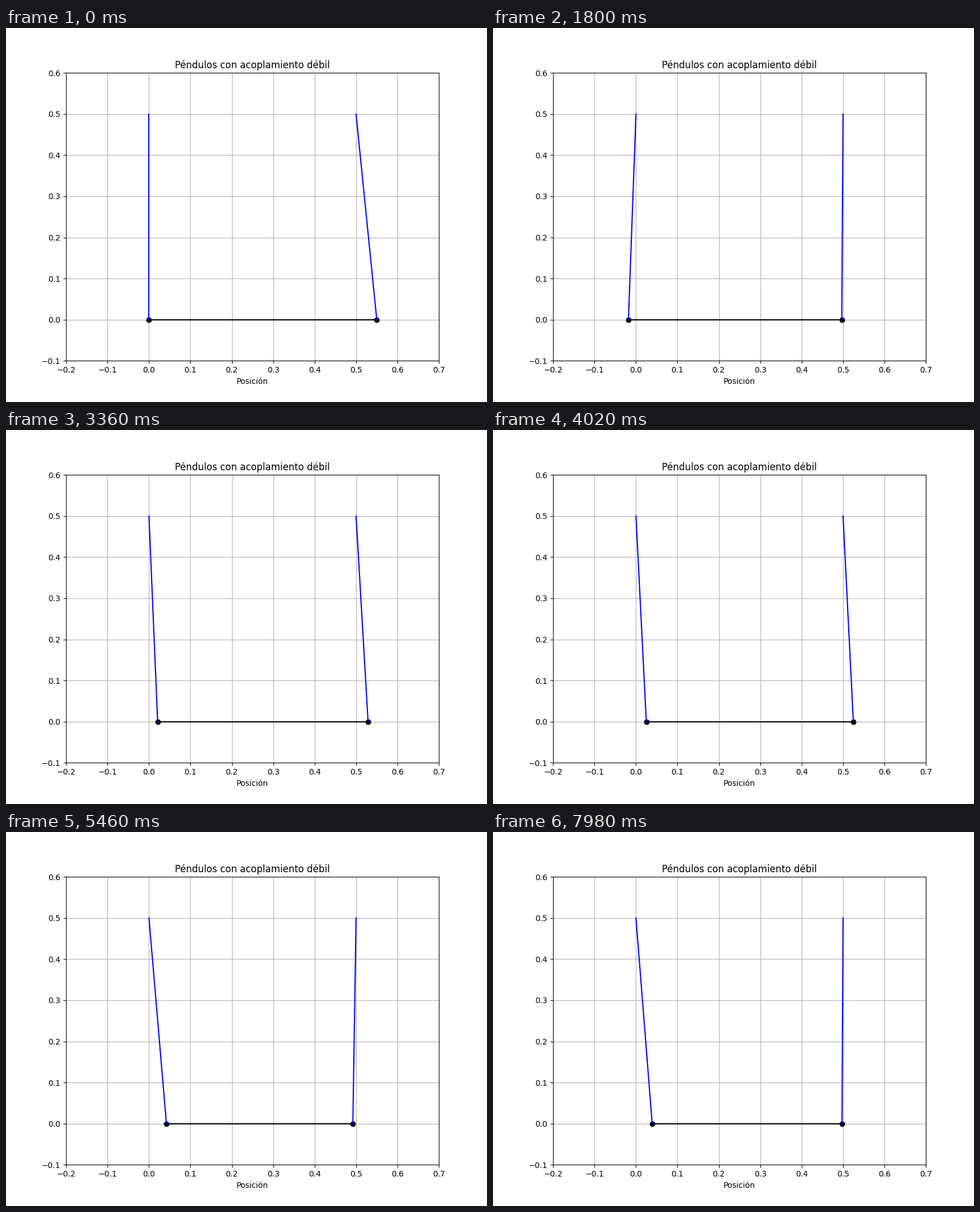
Write a matplotlib script that moves like this. It is 849x660 px and loops after 8 s.

```python
import numpy as np
import matplotlib.pyplot as plt
from matplotlib.animation import FuncAnimation

INTERVAL = 20        # ms per drawn frame
HOLD = 3             # drawn frames per simulation step
FRAMES = 400

AMPLITUDE = 0.05
LENGTH = 0.5
PIVOTS = (0.0, 0.5)
# Normal modes, in radians per simulation step
IN_PHASE = 2 * np.pi * 0.08933
OPPOSED = 2 * np.pi * 0.09329


def bob_positions(step):
    """Horizontal bob positions from the sum of both normal modes."""
    together = np.cos(IN_PHASE * step)
    apart = np.cos(OPPOSED * step)
    left = PIVOTS[0] + AMPLITUDE / 2 * (together - apart)
    right = PIVOTS[1] + AMPLITUDE / 2 * (together + apart)
    return left, right


fig, ax = plt.subplots(figsize=(8.49, 6.6), dpi=100)
ax.set_xlim(-0.2, 0.7)
ax.set_ylim(-0.1, 0.6)
ax.set_xlabel("Posición")
ax.set_title("Péndulos con acoplamiento débil")
ax.grid(True)

spring, = ax.plot([], [], "o-", color="black")
rods = [ax.plot([], [], "b-")[0] for _ in PIVOTS]


def update(frame):
    bobs = bob_positions(frame // HOLD)
    spring.set_data(bobs, (0, 0))
    for rod, pivot, bob in zip(rods, PIVOTS, bobs):
        rod.set_data((pivot, bob), (LENGTH, 0))
    return [spring, *rods]


def init():
    return update(0)


anim = FuncAnimation(fig, update, frames=FRAMES, init_func=init,
                     interval=INTERVAL, repeat=True, repeat_delay=0, blit=True)
plt.show()
```
